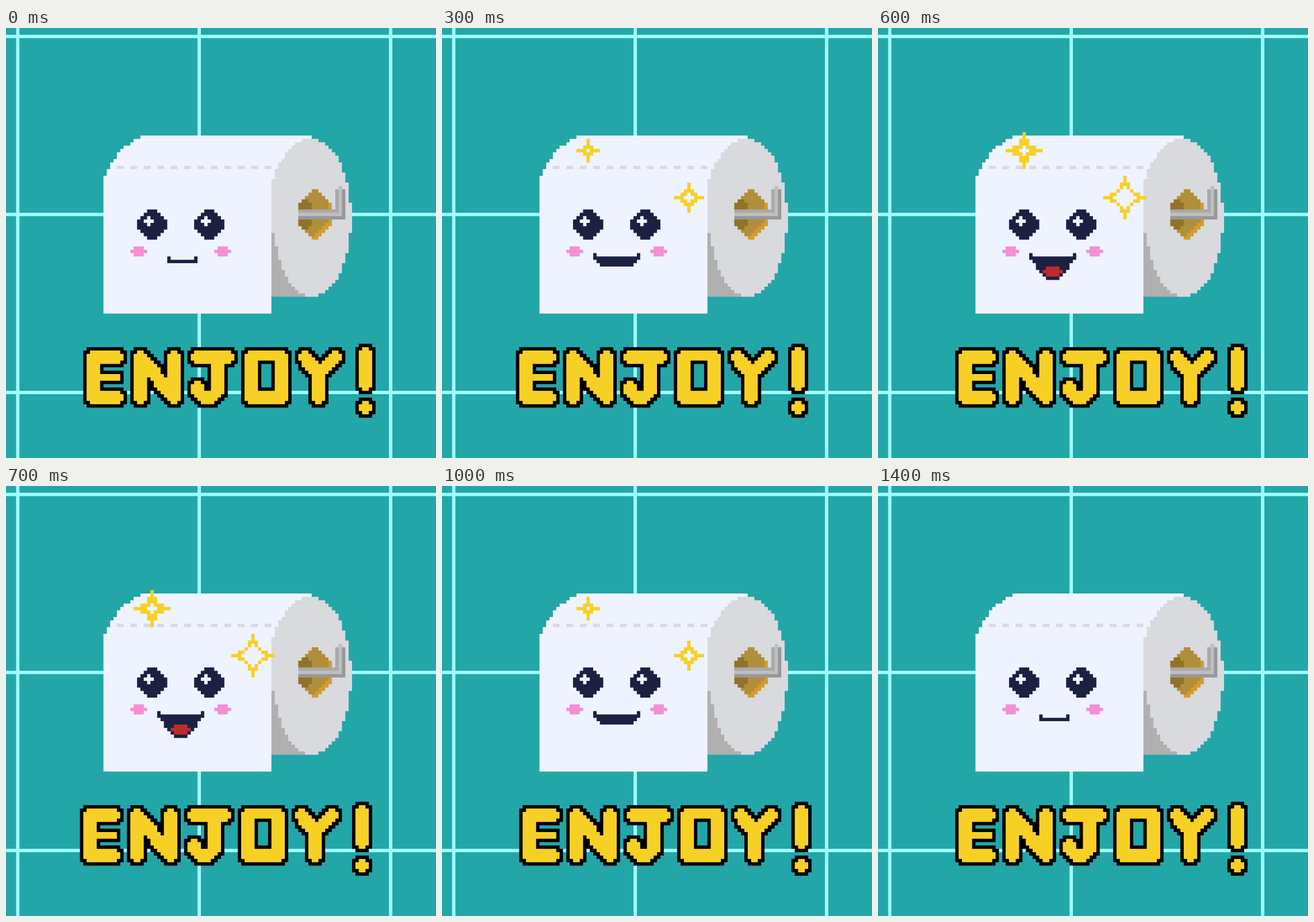
Animation, 748 px wide and 748 px high, one loop 1.5 s. Source, as an HTML page with a canvas:

```html
<!DOCTYPE html>
<html lang="en">
<head>
<meta charset="utf-8">
<title>Enjoy!</title>
<style>
  html, body { margin: 0; width: 100%; height: 100%; overflow: hidden; background: #23a6a8; }
  canvas { display: block; width: 748px; height: 748px; }
</style>
</head>
<body>
<canvas id="stage" role="img" aria-label="ENJOY!"></canvas>
<script>
const SIZE = 128, CELL = 6;
const TEAL = '#23a6a8', LINE = '#a0ffff', PAPER = '#eef3ff', NAVY = '#1c2142', RED = '#bc2c2c';
const GRAY = '#d9dadd', SHADE = '#b0b0b0', YELLOW = '#f7d026', PINK = '#f58fd3';

const canvas = document.getElementById('stage');
canvas.width = canvas.height = SIZE * CELL;
const ctx = canvas.getContext('2d');
ctx.scale(CELL, CELL);

function rect(color, x, y, w = 1, h = 1) {
  ctx.fillStyle = color;
  ctx.fillRect(x, y, w, h);
}

// Lists the cells whose centre passes a test, then paints them.
function cells(inside) {
  const found = [];
  for (let y = 0; y < SIZE; y++)
    for (let x = 0; x < SIZE; x++)
      if (inside(x + 0.5, y + 0.5)) found.push([x, y]);
  return found;
}
const fill = (color, inside) => cells(inside).forEach(([x, y]) => rect(color, x, y));

// Box with its corners cut at 45 degrees
const octagon = (cx, cy, rx, ry, cut) => (x, y) => {
  const dx = Math.abs(x - cx), dy = Math.abs(y - cy);
  return dx <= rx && dy <= ry && dx + dy <= cut;
};

function segmentDistance(x, y, [x0, y0], [x1, y1]) {
  const dx = x1 - x0, dy = y1 - y0;
  const t = ((x - x0) * dx + (y - y0) * dy) / (dx * dx + dy * dy || 1);
  const k = Math.max(0, Math.min(1, t));
  return Math.hypot(x - x0 - k * dx, y - y0 - k * dy);
}

// Round brush along a path written like "26,98 33,98"
function stroke(path, radius = 2) {
  const pts = path.split(' ').map(p => p.split(',').map(Number));
  return cells((x, y) => pts.some((p, i) =>
    segmentDistance(x, y, p, pts[i + 1] || p) < radius));
}

const letters = [
  [...stroke('33,98 26,98 26,110 33,110'), ...stroke('26,104 33,104', 1)],
  stroke('40,110 40,98 50,110 50,98'),
  [...stroke('57,98 66,98'), ...stroke('63,98 63,108 61,110 59,110 57,108 57,107')],
  stroke('73,98 75,97.5 80,97.5 82,98 82,110 73,110 73,98'),
  stroke('89,98 93,103 93,110 93,103 98,98'),
  [...stroke('107,97 107,106'), ...stroke('107,113')]
];

function drawText(dx) {
  for (const letter of letters) {
    for (const [x, y] of letter) rect('#000', x + dx - 1, y - 1, 3, 3);
    for (const [x, y] of letter) rect(YELLOW, x + dx, y);
  }
}

function drawWall() {
  rect(TEAL, 0, 0, SIZE, SIZE);
  for (const x of [3, 57, 114]) rect(LINE, x, 0, 1, SIZE);
  for (const y of [2, 55, 108]) rect(LINE, 0, y, SIZE, 1);
}

function drawRoll() {
  // Sheet with a rounded shoulder at the upper left
  fill(PAPER, (x, y) => {
    const dx = Math.max(0, 41.5 - x) / 12.3, dy = Math.max(0, 46 - y) / 14;
    return y > 32 && y < 85 && x < (y < 48 ? 91 : 79) && dx ** 1.5 + dy ** 1.5 < 1;
  });
  for (let x = 33; x < 79; x += 4) rect(GRAY, x, 41, 2);

  // Round end and the shaded underside
  rect(GRAY, 79, 48, 4, 13);
  rect(SHADE, 79, 61, 12, 19);
  fill(GRAY, (x, y) => {
    const dx = x - 91, dy = y - 56.5;
    const rx = dx > 0 ? 11.7 : dy < 0 ? 13.2 : 11.2;
    return x > 79 && Math.hypot(dx / rx, dy / 23.5) < 1;
  });

  // Cardboard core: one outline, with shifted copies for its shading
  const core = octagon(92, 55.5, 5, 7, 8);
  const shade = (color, dx, dy) => fill(color, (x, y) => core(x, y) && core(x - dx, y - dy));
  shade('#d49c2c', 0, 0);
  shade('#b18e3a', -1, -1);
  shade('#91722b', -6, 0);

  // Holder
  rect('#bfbfbf', 99, 47);
  ['#a9a9a9', '#bfbfbf', '#989898'].forEach((color, i) => {
    rect(color, 98 + i, 48, 1, 7 + i);
    rect(color, 87, 54 + i, 12 + i);
  });
}

function drawFace(mood) {
  for (const x of [43.5, 60.5]) {
    fill(NAVY, octagon(x, 58.5, 4, 4, 5));
    fill(PAPER, octagon(x - 1, 57.5, 1, 1, 1));
  }
  for (const x of [39.5, 64.5]) fill(PINK, octagon(x, 66.5, 2, 1, 2));

  const [left, top, width] = mood ? [45, 67, 14] : [48, 68, 9];
  rect(NAVY, left, top);
  rect(NAVY, left + width - 1, top);
  const rows = [1, 3, 7][mood];
  for (let i = 0; i < rows; i++) {
    const inset = i < 3 ? i : i - 1;
    rect(NAVY, left + inset, top + 1 + i, width - 2 * inset);
  }
  if (mood === 2) {
    rect(RED, 50, 71, 4, 3);
    rect(RED, 49, 72, 6);
  }
}

// Four-pointed star that opens up in the middle as it grows
function drawSparkle(cx, cy, level) {
  if (level <= 0) return;
  const r = level < 2 ? 1 : level + 1;
  const hole = [-1, -1, 0, 1, 1, 3][level];
  fill(YELLOW, (px, py) => {
    const x = Math.abs(px - 0.5 - cx), y = Math.abs(py - 0.5 - cy), sum = x + y;
    const arm = x * y === 0 && sum <= r;
    const body = x * y <= r - 2 && sum < r;
    return sum > hole && (arm || body);
  });
}

function draw(step) {
  const rise = Math.max(0, Math.min(step, 13 - step));
  const level = Math.min(rise, 5);
  drawWall();
  drawRoll();
  drawFace(Math.min(rise >> 1, 2));
  drawSparkle(43, 36, level - 1);
  drawSparkle(73, 50, level);
  drawText(-(step % 2));
}

let start, shown;
function tick(now) {
  start ??= now;
  const step = Math.floor((now - start) % 1500 / 100);
  if (step !== shown) draw(shown = step);
  requestAnimationFrame(tick);
}
draw(shown = 0);
requestAnimationFrame(tick);
</script>
</body>
</html>
```
